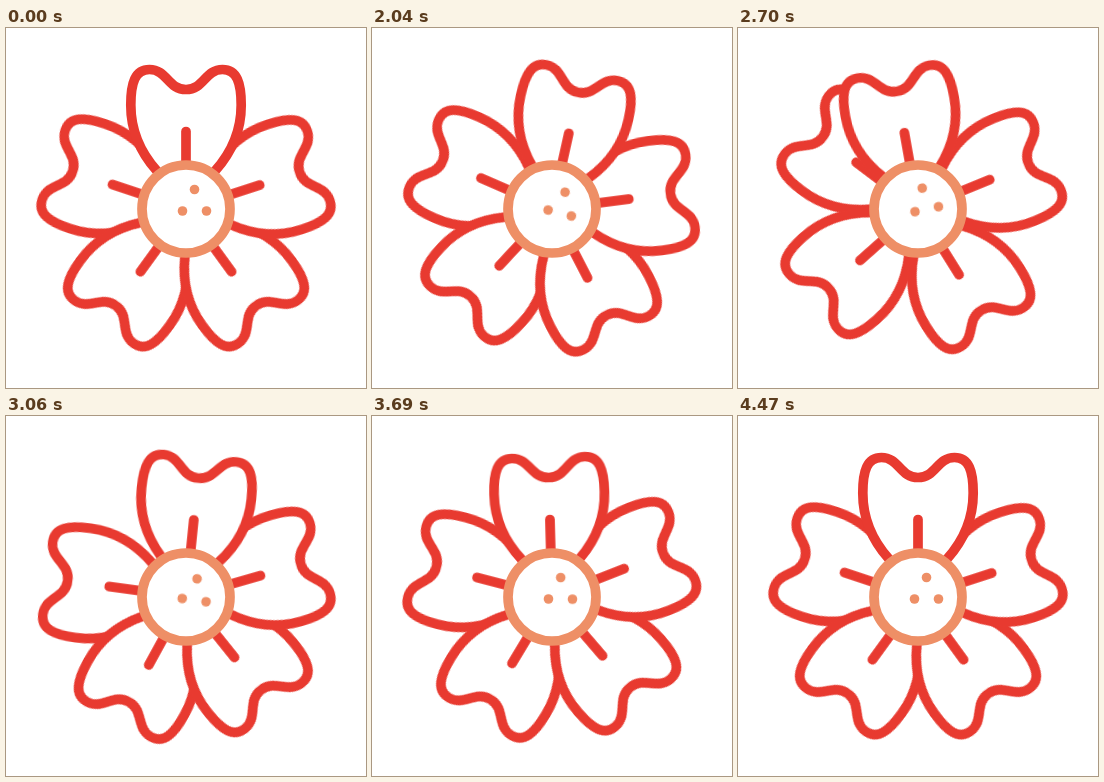
Animation, 360 px wide and 360 px high, one loop 4.5 s. Source, as an HTML page:

```html
<!DOCTYPE html>
<html lang="en">
<head>
<meta charset="utf-8">
<title>Flower</title>
<style>
  html, body { margin: 0; width: 100%; height: 100%; overflow: hidden; background: #fff; }
  svg { display: block; width: 100vw; height: 100vh; }
  .petal { fill: #fff; stroke: #e83a30; stroke-width: 9.7; stroke-linecap: round; stroke-linejoin: round; }
  .ring { fill: #fff; stroke: #ee8f66; stroke-width: 9.7; }
  .dots { fill: #ee8f66; }

  /* Each part repeats the same damped swing, 60 ms after its neighbour. */
  .sway {
    transform-origin: 0 0;
    animation: sway 4500ms calc(var(--i) * 60ms) infinite cubic-bezier(.364, 0, .636, 1);
  }
  @keyframes sway {
    0% { transform: rotate(0deg); }
    33.2% { transform: rotate(0deg); animation-timing-function: cubic-bezier(.364, .182, .636, .818); }
    52% { transform: rotate(21deg); }
    59.9% { transform: rotate(-12deg); }
    68.56% { transform: rotate(8deg); }
    77% { transform: rotate(-5deg); }
    85.33% { transform: rotate(3.5deg); }
    92%, 100% { transform: rotate(0deg); }
  }
</style>
</head>
<body>
<svg viewBox="0 0 360 360">
  <defs>
    <g id="petal" class="petal">
      <path d="M0 0L-29-38C-47-58-55.2-80-55.2-104C-55.2-126-51-139.5-36.5-139.5C-19-139.5-18-119.5 0-119.5C18-119.5 19-139.5 36.5-139.5C51-139.5 55.2-126 55.2-104C55.2-80 47-58 29-38Z"/>
      <path d="M0-44V-77.5"/>
    </g>
  </defs>
  <g transform="translate(180 181)">
    <g transform="rotate(288.4)"><g class="sway" style="--i:5"><use href="#petal"/></g></g>
    <g transform="rotate(216)"><g class="sway" style="--i:4"><use href="#petal"/></g></g>
    <g transform="rotate(144)"><g class="sway" style="--i:3"><use href="#petal"/></g></g>
    <g transform="rotate(72)"><g class="sway" style="--i:2"><use href="#petal"/></g></g>
    <g class="sway" style="--i:1"><use href="#petal"/></g>
    <circle class="ring" r="44"/>
    <g class="sway dots" style="--i:0">
      <circle cx="8.5" cy="-19.5" r="4.8"/>
      <circle cx="-3.5" cy="2" r="4.8"/>
      <circle cx="20.5" cy="2" r="4.8"/>
    </g>
  </g>
</svg>
</body>
</html>
```
